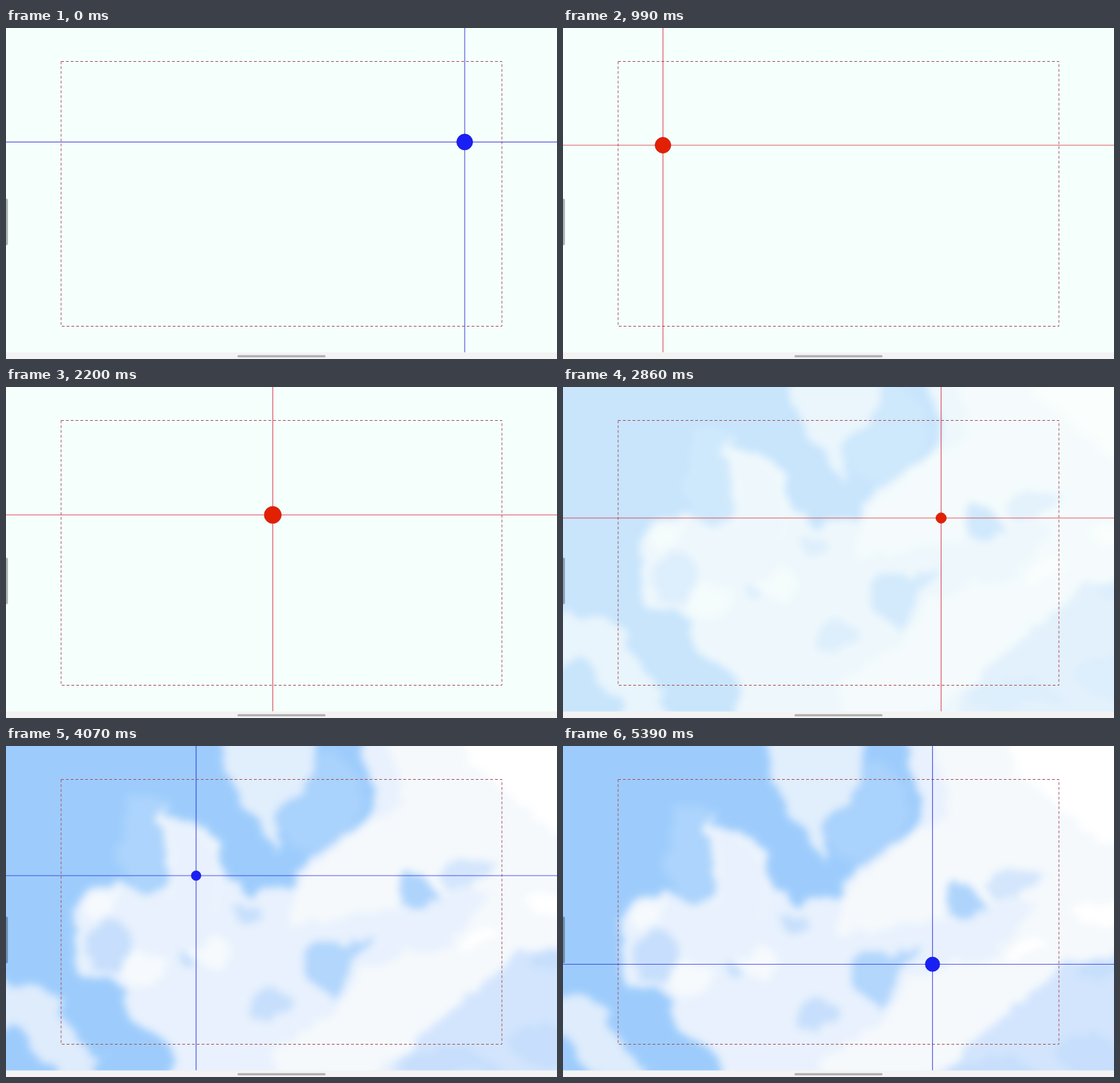
An HTML page that plays this animation: 800x480 px, repeating every 5500 ms.

```html
<!DOCTYPE html>
<html lang="en">
<head>
<meta charset="utf-8">
<title>Pointer crosshair</title>
<style>
  html, body { margin: 0; width: 100%; height: 100%; overflow: hidden; background: #f5fffc; }
  svg { position: absolute; left: 0; top: 0; }
</style>
</head>
<body>
<svg width="800" height="480" viewBox="0 0 800 480">
  <defs>
    <filter id="wisps" filterUnits="userSpaceOnUse" x="-60" y="-60" width="920" height="600" color-interpolation-filters="sRGB">
      <feGaussianBlur stdDeviation="8"/>
      <feTurbulence type="fractalNoise" baseFrequency=".022" numOctaves="4" seed="7" result="noise"/>
      <feDisplacementMap in2="noise" scale="45" xChannelSelector="R" yChannelSelector="G" in="SourceGraphic" result="rough"/>
      <feGaussianBlur in="rough" stdDeviation="6"/>
    </filter>
  </defs>

  <g id="sky" opacity="0">
    <rect x="-80" y="-80" width="960" height="640" fill="#9dccfc"/>
    <g filter="url(#wisps)">
      <rect x="-100" y="-100" width="1000" height="700" fill="#9dccfc"/>
      <ellipse cx="200" cy="150" rx="35" ry="85" fill="#acd4fc"/>
      <ellipse cx="450" cy="80" rx="70" ry="70" fill="#a9d2fc"/>
      <path fill="#e8f1fd" d="M515-80 525 30 540 70 525 105 480 135 430 165 405 205 360 215 320 190 310 150 285 115 250 95 225 95 235 150 235 205 180 205 110 215 100 260 110 330 165 345 185 390 240 440 230 560H900V-80Z"/>
      <path fill="#e1eefc" d="M290-80 325 40 352 90 388 155 392 100 425 60 440 30 470-80Z"/>
      <path fill="#deecfc" d="M-80 340 30 345 75 370 100 420 135 450 150 560H85L60 470 20 410-80 420Z"/>
      <path fill="#f5f9fc" d="M530-80 570 80 480 145 420 190 420 250 560 240 660 200 700 230 640 280 520 330 440 410 380 450 400 560 560 460 700 340 900 250V-80Z"/>
      <path fill="#d3e5fd" d="M900 260 740 300 700 345 610 400 560 470V560H900Z"/>
      <g fill="#c7dffc">
        <ellipse cx="150" cy="290" rx="34" ry="38"/>
        <ellipse cx="385" cy="378" rx="34" ry="24"/>
        <ellipse cx="345" cy="245" rx="18" ry="14"/>
        <ellipse cx="264" cy="313" rx="9" ry="11"/>
        <ellipse cx="675" cy="180" rx="40" ry="22" opacity=".7"/>
        <ellipse cx="640" cy="460" rx="70" ry="24"/>
        <ellipse cx="785" cy="440" rx="50" ry="35"/>
        <ellipse cx="790" cy="305" rx="30" ry="20"/>
      </g>
      <path fill="#b2d6fc" d="M535 272 490 330 468 362 440 335 425 310 470 285Z"/>
      <ellipse cx="602" cy="210" rx="33" ry="27" fill="#aed4fc"/>
      <g fill="none" stroke="#f1f7fd" stroke-width="9" opacity=".8">
        <path d="M232 85 245 150 235 225M270 112 308 165 300 230"/>
      </g>
      <g fill="#f6fafd">
        <ellipse cx="200" cy="328" rx="38" ry="26"/>
        <ellipse cx="135" cy="230" rx="22" ry="14"/>
        <ellipse cx="300" cy="300" rx="30" ry="22"/>
      </g>
      <g fill="#fff">
        <path d="M665-80 670 35 725 60 735 90 790 120 900 130V-80Z"/>
        <ellipse cx="790" cy="225" rx="34" ry="18"/>
        <ellipse cx="690" cy="280" rx="36" ry="16" transform="rotate(-25 690 280)"/>
      </g>
    </g>
  </g>

  <rect x="80" y="48.5" width="640" height="384" fill="none" stroke="#a8505f" stroke-dasharray="4 3"/>
  <path id="cross" fill="none" stroke-width="1.2" stroke-opacity=".72"/>
  <circle id="dot" stroke-opacity=".8"/>
  <rect y="470.5" width="800" height="9.5" fill="#f3f3f3"/>
  <rect x="336" y="474.5" width="128" height="3" rx="1.5" fill="#acacac"/>
  <rect x="-4" y="247.5" width="6.8" height="67.5" rx="2" fill="#000" opacity=".3"/>
</svg>

<script>
const LOOP = 5500, STEP = 110;
const RED = ['#e32004', '#c41c0c', '#d81a30'], BLUE = ['#1a20f4', '#1414d0', '#2020d8'];

// time, x, y, radius, colours
const keys = [
  [0, 666, 165.3, 11.5, BLUE],
  [550, 213, 164, 7.5, RED],
  [1540, 189, 178.5, 16, BLUE],
  [2860, 549, 190, 7.5, RED],
  [4070, 276, 188, 7, BLUE],
  [4950, 533, 346.5, 9, RED],
  [5390, 536.5, 316.5, 10.5, BLUE]
];

const sky = document.getElementById('sky');
const cross = document.getElementById('cross');
const dot = document.getElementById('dot');
const clamp = v => Math.max(0, Math.min(1, v));

function slope(i, part) {
  const a = keys[Math.max(0, i - 1)], b = keys[Math.min(keys.length - 1, i + 1)];
  return (b[part] - a[part]) / (b[0] - a[0]);
}

// Cubic Hermite curve through the keys
function curve(i, u, part) {
  const a = keys[i], b = keys[i + 1], span = b[0] - a[0], v = 1 - u;
  return v * v * (1 + 2 * u) * a[part] + u * u * (3 - 2 * u) * b[part]
    + span * u * v * (v * slope(i, part) - u * slope(i + 1, part));
}

function draw(now) {
  let step = Math.floor(now % LOOP / STEP);
  if (step === 4 || step === 17) step--; // the pointer rests here
  const t = step * STEP;

  let i = 0;
  while (i < keys.length - 2 && t >= keys[i + 1][0]) i++;
  const u = (t - keys[i][0]) / (keys[i + 1][0] - keys[i][0]);
  const [x, y, r] = [1, 2, 3].map(part => curve(i, u, part));
  const [fill, rim, line] = keys[u < .5 ? i : i + 1][4];

  cross.setAttribute('d', `M0 ${y}H800M${x} 0V470.5`);
  cross.setAttribute('stroke', line);
  dot.setAttribute('cx', x);
  dot.setAttribute('cy', y);
  dot.setAttribute('r', Math.max(6, r));
  dot.setAttribute('fill', fill);
  dot.setAttribute('stroke', rim);

  const drift = (t - 4070) * .011;
  sky.setAttribute('opacity', clamp((t - 2200) / 1300));
  sky.setAttribute('transform', `translate(${-drift} ${drift})`);
}

function tick() {
  draw(performance.now());
  requestAnimationFrame(tick);
}
tick();
</script>
</body>
</html>
```
